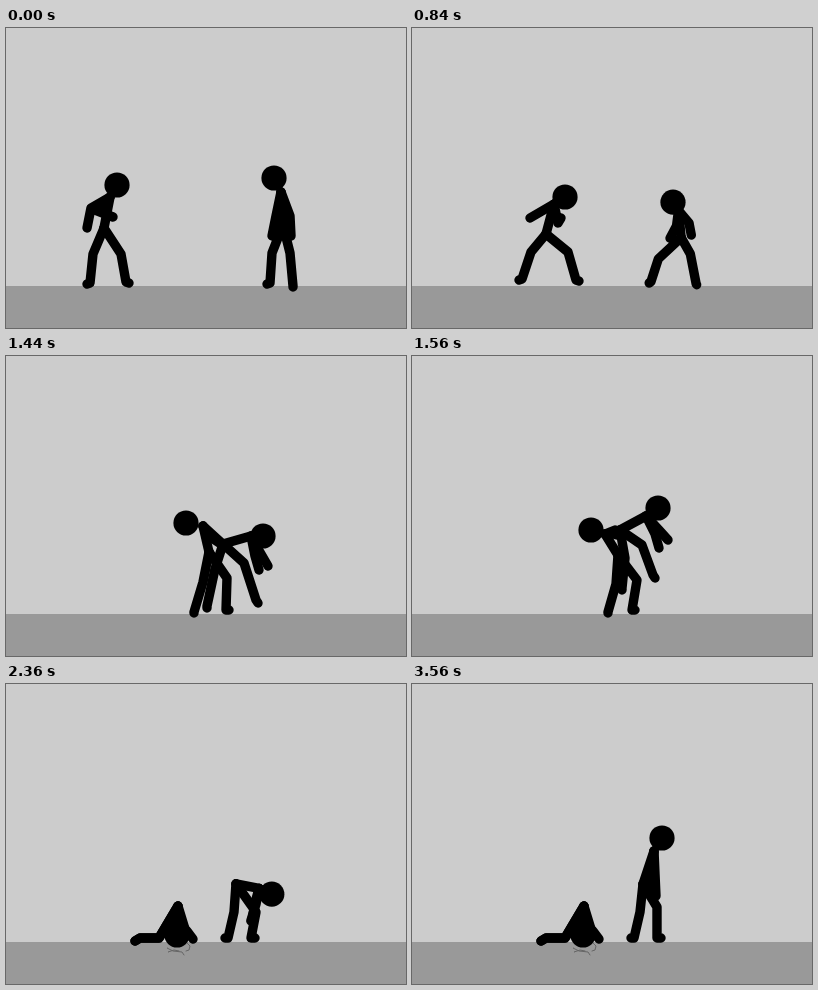
Recreate the animation shown at these times as an HTML page with a canvas. Size 400x300 px, loop 4.4 s.

```html
<!DOCTYPE html>
<html lang="en">
<head>
<meta charset="utf-8">
<title>Stick fight</title>
<style>
html, body { margin: 0; width: 100%; height: 100%; overflow: hidden; background: #fff; }
canvas { display: block; width: 400px; height: 300px; }
</style>
</head>
<body>
<canvas id="stage" width="400" height="300"></canvas>
<script>
const ctx = document.getElementById('stage').getContext('2d');
const LOOP = 4400, TICK = 40, IMPACT = 1720;

// Runs of drawings: [how many, ticks each one is held]
const RUNS = [[5, 2], [17, 1], [4, 2], [1, 1], [2, 2], [5, 1], [4, 2], [3, 1], [9, 3], [1, 6], [1, 21]];
const steps = [];
let clock = 0;
for (const [count, ticks] of RUNS) {
  for (let i = 0; i < count; i++) {
    steps.push(clock);
    clock += ticks * TICK;
  }
}

// Each pose lists only the joints that differ from the pose before it.
// e/h: elbow and hand, k/f: knee and foot, t: toe offset from the foot.
function track(...keys) {
  let pose = {};
  return keys.map(([time, change]) => ({ time, pose: pose = { ...pose, ...change } }));
}

const fighter = track(
  [0, { head: [111, 157], neck: [104, 169], hip: [98, 200],
    e1: [85, 180], h1: [81, 200], e2: [89, 182], h2: [107, 189],
    k1: [87, 226], f1: [84, 255], t1: [-3, 1], k2: [115, 226], f2: [120, 254], t2: [3, 1] }],
  [640, { head: [106, 157], neck: [98, 169], hip: [94, 200],
    e1: [88, 171], h1: [77, 176], e2: [104, 186], h2: [109, 187],
    k1: [83, 226], k2: [113, 226] }],
  [840, { head: [153, 169], neck: [142, 176], hip: [134, 206],
    e1: [130, 183], h1: [118, 190], e2: [146, 195], h2: [149, 190],
    k1: [119, 224], f1: [110, 251], k2: [156, 224], f2: [164, 252] }],
  [1040, { head: [203, 183], neck: [190, 184], hip: [177, 209],
    e1: [186, 182], h1: [166, 192], e2: [191, 204], h2: [176, 201],
    k1: [162, 230], f1: [167, 255], t1: [-3, 1], k2: [204, 232], f2: [220, 253], t2: [3, -2] }],
  [1240, { head: [213, 179], neck: [203, 186], hip: [188, 208],
    e1: [215, 201], h1: [232, 207], e2: [212, 199], h2: [230, 205],
    k1: [174, 230], f1: [168, 254], k2: [210, 224], f2: [220, 254], t2: [3, 0] }],
  [1440, { head: [180, 167], neck: [197, 170], hip: [203, 196],
    e1: [209, 181], h1: [219, 190], e2: [206, 182], h2: [218, 190],
    k1: [197, 226], f1: [188, 256], t1: [0, 1], k2: [221, 222] }],
  [1520, { head: [179, 174], neck: [193, 178], hip: [206, 199],
    e1: [203, 174], h1: [210, 176], e2: [201, 178], h2: [209, 180],
    k1: [204, 228], f1: [196, 256], k2: [225, 224] }],
  [1600, { head: [180, 195], neck: [191, 188], hip: [210, 201],
    e1: [183, 180], h1: [189, 171], e2: [185, 181], h2: [191, 174],
    k1: [222, 224], f1: [218, 249], k2: [231, 226], f2: [222, 254], t2: [-3, 0] }],
  [1680, { head: [190, 222], neck: [192, 208], hip: [213, 202],
    e1: [181, 201], h1: [176, 188], e2: [181, 203], h2: [176, 190],
    k1: [236, 209], f1: [242, 236], k2: [234, 230] }],
  [1720, { head: [198, 236], neck: [197, 223], hip: [215, 206],
    e1: [185, 223], h1: [172, 222], e2: [185, 223], h2: [172, 222],
    k1: [238, 209], f1: [248, 232], t1: [3, -2], k2: [235, 232], f2: [223, 254] }],
  [1960, { head: [199, 237], f1: [247, 235] }],
  [2080, { head: [236, 183], neck: [226, 188], hip: [224, 207],
    e1: [214, 206], h1: [202, 217], e2: [220, 208], h2: [211, 222],
    k1: [248, 222], f1: [248, 250], t1: [4, 0], k2: [231, 231] }],
  [2240, { head: [265, 213], neck: [253, 206], hip: [230, 200],
    e1: [249, 220], h1: [246, 237], e2: [250, 221], h2: [245, 237],
    k1: [250, 228], f1: [245, 254], k2: [228, 228], f2: [222, 254] }],
  [2840, { head: [269, 199], neck: [253, 198], hip: [230, 199],
    e1: [249, 215], h1: [245, 237], e2: [250, 216], h2: [244, 236] }],
  [3320, { head: [262, 168], neck: [250, 178],
    e1: [250, 201], h1: [246, 222], e2: [244, 199], h2: [243, 220],
    k1: [246, 227] }],
  [3560, { head: [250, 154], neck: [242, 167], hip: [231, 200],
    e1: [243, 190], h1: [244, 212], e2: [238, 195], h2: [241, 211],
    k1: [245, 223] }]
);

const rival = track(
  [0, { head: [268, 150], neck: [275, 164], hip: [277, 197],
    e1: [284, 188], h1: [285, 208], e2: [270, 188], h2: [266, 208],
    k1: [266, 225], f1: [264, 255], t1: [-3, 1], k2: [284, 225], f2: [287, 258], t2: [0, 1] }],
  [640, { head: [258, 169], neck: [271, 179], hip: [284, 208],
    e1: [295, 197], h1: [291, 214], e2: [279, 200], h2: [269, 212],
    k1: [261, 225], f1: [263, 255], t1: [-2, 1], k2: [285, 226], f2: [299, 256] }],
  [800, { head: [261, 172], neck: [270, 181], hip: [276, 209],
    e1: [285, 196], h1: [290, 209], e2: [267, 198], h2: [260, 210],
    k1: [252, 230], f1: [247, 254], k2: [282, 226], f2: [290, 256] }],
  [1040, { head: [261, 185], neck: [249, 190], hip: [235, 213],
    e1: [237, 190], h1: [226, 198], e2: [252, 198], h2: [248, 211],
    k1: [218, 235], f1: [199, 251], t1: [-1, 4], k2: [260, 225], f2: [255, 255], t2: [3, 0] }],
  [1240, { head: [262, 181], neck: [250, 184], hip: [228, 204],
    e1: [242, 199], h1: [238, 212], e2: [253, 199], h2: [255, 213],
    k1: [214, 227], f1: [200, 251], t1: [0, 2], k2: [251, 218], f2: [255, 253] }],
  [1440, { head: [257, 180], neck: [245, 180], hip: [217, 188],
    e1: [249, 200], h1: [253, 214], e2: [251, 191], h2: [262, 210],
    k1: [209, 213], f1: [201, 250], k2: [238, 207], f2: [250, 244], t2: [2, 3] }],
  [1520, { head: [246, 152], neck: [234, 160], hip: [208, 174],
    e1: [243, 178], h1: [247, 192], e2: [247, 174], h2: [256, 184],
    k1: [213, 202], f1: [210, 232], k2: [230, 189], f2: [241, 219] }],
  [1600, { head: [166, 145], neck: [177, 150], hip: [190, 171],
    e1: [162, 164], h1: [151, 171], e2: [167, 166], h2: [157, 177],
    k1: [216, 169], f1: [229, 190], k2: [210, 157], f2: [234, 165] }],
  [1680, { head: [161, 222], neck: [166, 210], hip: [175, 186],
    e1: [158, 227], h1: [164, 241], e2: [155, 216], h2: [152, 232],
    k1: [190, 162], f1: [212, 154], k2: [184, 160], f2: [199, 143] }],
  [1720, { head: [171, 251], neck: [179, 245], hip: [172, 222],
    e1: [181, 247], h1: [187, 255], e2: [171, 233], h2: [170, 245],
    k1: [178, 193], f1: [188, 175], k2: [171, 192], f2: [178, 174], t2: [1, 2] }],
  [1800, { k1: [157, 197], f1: [146, 176], k2: [154, 199], f2: [140, 180] }],
  [1880, { k1: [146, 222], f1: [129, 211], k2: [147, 226], f2: [129, 218], t1: [-1, 2], t2: [-1, 2] }],
  [1960, { k1: [153, 254], f1: [134, 254], k2: [153, 254], f2: [134, 254], t1: [-5, 3], t2: [-5, 3] }]
);

function poseAt(keys, time) {
  const next = keys.findIndex(key => key.time > time);
  if (next < 0) return keys[keys.length - 1].pose;
  const a = keys[next - 1], b = keys[next];
  const u = (time - a.time) / (b.time - a.time);
  const pose = {};
  for (const joint in a.pose) {
    pose[joint] = a.pose[joint].map((v, i) => v + (b.pose[joint][i] - v) * u);
  }
  return pose;
}

function line(...points) {
  ctx.beginPath();
  points.forEach(p => ctx.lineTo(p[0], p[1]));
  ctx.stroke();
}

function drawFigure(p) {
  ctx.strokeStyle = ctx.fillStyle = '#000';
  ctx.lineWidth = 9.4;
  line(p.neck, p.hip);
  for (const s of [1, 2]) {
    const foot = p['f' + s], toe = p['t' + s];
    line(p.neck, p['e' + s], p['h' + s]);
    line(p.hip, p['k' + s], foot, [foot[0] + toe[0], foot[1] + toe[1]]);
  }
  ctx.beginPath();
  ctx.arc(p.head[0], p.head[1], 12.6, 0, Math.PI * 2);
  ctx.fill();
}

function drawCracks() {
  ctx.strokeStyle = '#666';
  ctx.lineWidth = 1;
  line([161, 264], [167, 267], [176, 268], [178, 271]);
  line([162, 268], [168, 266], [173, 267]);
  line([181, 259], [184, 262], [183, 266], [180, 267]);
}

function draw(time) {
  ctx.fillStyle = '#fff';
  ctx.fillRect(0, 0, 400, 300);
  ctx.save();
  if (time === IMPACT) ctx.translate(0, 14);
  ctx.fillStyle = '#ccc';
  ctx.fillRect(0, 0, 400, 258);
  ctx.fillStyle = '#999';
  ctx.fillRect(0, 258, 400, 42);
  ctx.lineCap = ctx.lineJoin = 'round';
  if (time >= IMPACT) drawCracks();
  drawFigure(poseAt(rival, time));
  drawFigure(poseAt(fighter, time));
  ctx.restore();
}

const start = performance.now();
function frame() {
  const now = (performance.now() - start) % LOOP;
  draw(steps.filter(t => t <= now).pop());
  requestAnimationFrame(frame);
}
frame();
</script>
</body>
</html>
```
